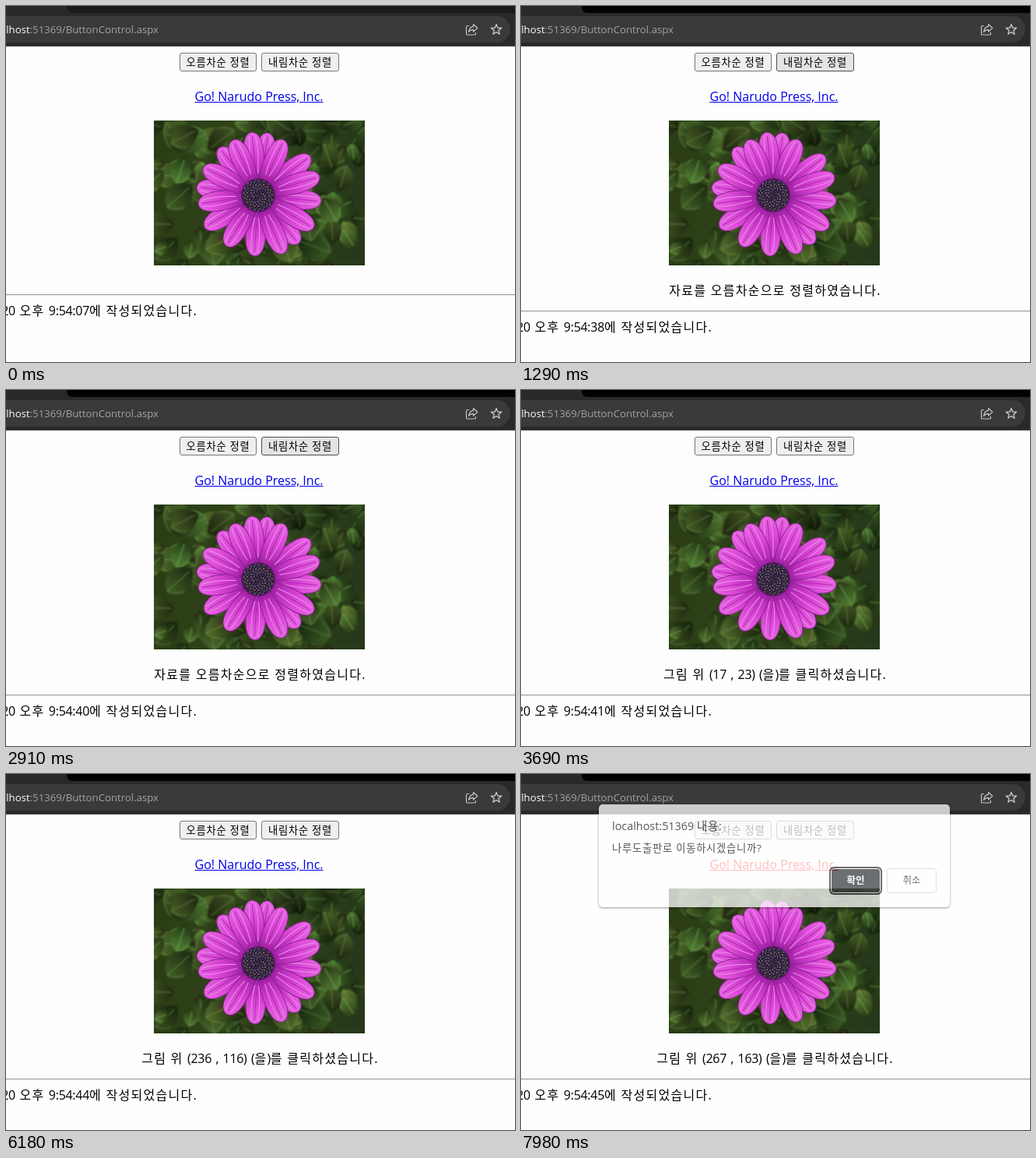
Recreate the animation shown at these times as an HTML page with a canvas. Size 654 by 457 pixels, loop 8000 ms.

```html
<!DOCTYPE html>
<html lang="ko">
<head>
<meta charset="utf-8">
<title>ButtonControl</title>
<style>
html, body { margin: 0; width: 100%; height: 100%; overflow: hidden; background: #fff; }
body { font: 16px/24px "Open Sans", "Noto Sans CJK KR", "Noto Sans CJK JP", "Noto Sans", sans-serif; color: #000; }
#stage { position: relative; width: 654px; height: 457px; overflow: hidden; background: #fefefe; }
#stage * { position: absolute; box-sizing: border-box; white-space: pre; }
#stage i, #stage b { position: static; font-style: normal; font-weight: 400; }
#bar { left: 0; top: 0; }
#url { left: -31px; width: 227px; top: 18px; text-align: right; font-size: 13.2px; color: #a3a3a3; }
#url b { color: #fff; }
.btn { top: 60px; height: 24px; line-height: 22px; font-size: 13.33px; letter-spacing: .73px; text-align: center;
  border: 1px solid #767676; border-radius: 3px; background: #efefef; }
.btn.hover { background: #e4e4e4; border-color: #4f4f4f; }
.btn.press { background: #f5f5f5; border-color: #8d8d8d; }
#link { top: 104px; left: 0; width: 650px; text-align: center; color: #00e; text-decoration: underline; text-underline-offset: 1px; }
#link.active { color: #f00; }
#photo { left: 190px; top: 147px; }
.page { letter-spacing: 1.28px; }
.page i { letter-spacing: -.3px; }
#msg { left: 0; width: 653px; top: 353px; text-align: center; }
#rule { left: 0; width: 654px; height: 2px; border-top: 1px solid #9a9a9a; border-bottom: 1px solid #eee; }
#date { right: 408px; }
#dialog { left: 100px; top: 39px; width: 451px; height: 132px; background: #fff; border-radius: 5px;
  box-shadow: 0 1px 3px rgba(0,0,0,.55); color: #202124; }
#dialog .title { left: 17px; top: 16px; font-size: 14.4px; }
#dialog .ask { left: 17px; top: 44px; font-size: 13.33px; letter-spacing: .73px; }
#dialog .act { top: 82px; width: 64px; height: 32px; line-height: 30px; font-size: 12.5px; text-align: center;
  border: 1px solid #d5d7da; border-radius: 4px; color: #3c4043; }
#dialog .ok { left: 298px; background: #3c4043; color: #fff; font-weight: 600; border-color: #fff;
  box-shadow: 0 0 0 2px #3c4043; }
#dialog .no { left: 370px; }
</style>
</head>
<body>
<div id="stage">
  <svg id="bar" width="654" height="52">
    <rect width="654" height="52" fill="#292929"/>
    <path id="strip" d="M78 0H654V9H86Q78 9 78 1Z"/>
    <rect x="-40" y="13" width="688" height="34" rx="17" fill="#3a3a3a"/>
    <path d="M0 51.5H654" stroke="#4a4a4a"/>
    <g fill="none" stroke="#c4c4c4" stroke-width="1.2" stroke-linejoin="round">
      <path d="M595 25.5H592.5Q591.5 25.5 591.5 26.5V36Q591.5 37 592.5 37H602.5Q603.5 37 603.5 36V34"/>
      <path d="M600.5 23.5L605.8 28.3L600.5 33V30.3Q596.5 30.3 594.5 33.5Q595 27 600.5 26.3Z"/>
      <path id="star" stroke-width="1.4"/>
    </g>
  </svg>
  <div id="url"><b>localhost</b>:51369/ButtonControl.aspx</div>
  <div class="btn" id="asc" style="left:223px;width:99px">오름차순 정렬</div>
  <div class="btn" id="desc" style="left:328px;width:100px">내림차순 정렬</div>
  <div id="link">Go! Narudo Press, Inc.</div>
  <canvas id="photo" width="271" height="186"></canvas>
  <div id="msg" class="page"></div>
  <div id="rule"></div>
  <div id="date" class="page"></div>
  <div id="dialog">
    <div class="title">localhost:51369 <b style="letter-spacing:.7px">내용:</b></div>
    <div class="ask">나루도출판로 이동하시겠습니까?</div>
    <div class="act ok">확인</div>
    <div class="act no">취소</div>
  </div>
</div>
<script>
const LOOP = 8000;
const $ = id => document.getElementById(id);

const sorted = way => `자료를 ${way}차순으로 정렬하였습니다.`;
const clicked = (x, y) => `그림 위 (${x} , ${y}) (을)를 클릭하셨습니다.`;

// time, message, seconds of the page stamp
const PAGES = [
  [0, '', '07'],
  [960, sorted('오름'), '38'],
  [2100, sorted('내림'), '39'],
  [2640, sorted('오름'), '40'],
  [3180, sorted('내림'), '40'],
  [3690, clicked(17, 23), '41'],
  [3990, clicked(24, 147), '41'],
  [4320, clicked(35, 162), '42'],
  [4620, clicked(246, 158), '42'],
  [4980, clicked(251, 28), '42'],
  [5400, clicked(42, 31), '43'],
  [5670, clicked(118, 143), '43'],
  [6180, clicked(236, 116), '44'],
  [6450, clicked(154, 102), '44'],
  [6750, clicked(228, 37), '44'],
  [7020, clicked(267, 163), '45']
];

// time, state of the left button, state of the right button
const BUTTONS = [
  [0, '', ''], [210, 'hover', ''], [900, 'press', ''], [1020, 'hover', ''],
  [1230, '', ''], [1290, '', 'hover'], [2010, '', 'press'], [2100, '', 'hover'],
  [2280, '', ''], [2340, 'hover', ''], [2550, 'press', ''], [2640, 'hover', ''],
  [2850, '', ''], [2910, '', 'hover'], [3120, '', 'press'], [3180, '', 'hover'],
  [3300, '', '']
];

// time, opacity, vertical offset
const DIALOG = [[0, 0, -5], [7920, .25, -5], [7950, .5, -2], [7980, .75, 0]];

const at = (table, t) => table.findLast(row => row[0] <= t);
const tighten = s => s.replace(/[\d:(),]+/g, '<i>$&</i>');

function setHtml(el, html) {
  if (el.dataset.html !== html) el.innerHTML = el.dataset.html = html;
}

function render(t) {
  const [, msg, sec] = at(PAGES, t);
  const [, left, right] = at(BUTTONS, t);
  const [, alpha, dy] = at(DIALOG, t);
  const shift = msg ? 21 : 0;
  setHtml($('msg'), tighten(msg));
  setHtml($('date'), tighten(`2023-08-20 오후 9:54:${sec}에 작성되었습니다.`));
  $('rule').style.top = 370 + shift + 'px';
  $('date').style.top = 379 + shift + 'px';
  $('strip').style.fill = t < 900 ? '#1a1a1a' : '#020202';
  $('asc').className = 'btn ' + left;
  $('desc').className = 'btn ' + right;
  $('link').className = t >= 7830 ? 'active' : '';
  $('dialog').style.opacity = alpha;
  $('dialog').style.transform = `translateY(${dy}px)`;
}

function drawStar() {
  const points = Array.from({ length: 10 }, (_, i) => {
    const a = i * Math.PI / 5 - Math.PI / 2, r = i % 2 ? 3 : 7;
    return [630 + r * Math.cos(a), 30.5 + r * Math.sin(a)].map(v => v.toFixed(1)).join(' ');
  });
  $('star').setAttribute('d', 'M' + points.join('L') + 'Z');
}

function drawPhoto() {
  const c = $('photo').getContext('2d');
  let seed = 11;
  const rnd = () => (seed = seed * 16807 % 2147483647) / 2147483647;
  const shade = (x0, x1, ...colors) => {
    const g = c.createLinearGradient(x0, 0, x1, 0);
    colors.forEach((col, i) => g.addColorStop(i / (colors.length - 1), col));
    return g;
  };
  const disc = (x, y, r, fill) => {
    c.fillStyle = fill;
    c.beginPath();
    c.arc(x, y, r, 0, 7);
    c.fill();
  };

  // soft foliage
  c.fillStyle = shade(0, 271, '#2c3d16', '#2f4519', '#26381a');
  c.fillRect(0, 0, 271, 186);
  c.filter = 'blur(1px)';
  for (let i = 0; i < 130; i++) {
    const x = rnd() * 271, y = rnd() * 186, len = 18 + rnd() * 30, w = len * .5;
    const dark = x > 150 && y < 50 ? 9 : 0;
    const light = 22 + rnd() * 15 - dark;
    const hue = 82 + rnd() * 16;
    c.save();
    c.translate(x, y);
    c.rotate(rnd() * 6.28);
    c.fillStyle = shade(0, len, `hsl(${hue} 45% ${light * .4}%)`, `hsl(${hue} 42% ${light}%)`);
    c.beginPath();
    c.moveTo(0, 0);
    c.bezierCurveTo(len * .3, -w, len * .8, -w, len, 0);
    c.bezierCurveTo(len * .8, w, len * .3, w, 0, 0);
    c.fill();
    c.strokeStyle = `hsl(${hue} 36% ${light + 9}%)`;
    c.lineWidth = 1.2;
    c.beginPath();
    c.moveTo(len * .6, -w * .7);
    c.quadraticCurveTo(len * .9, -w * .5, len, 0);
    c.moveTo(4, 0);
    c.lineTo(len, 0);
    c.stroke();
    c.restore();
  }
  c.filter = 'none';

  // petals, by tip position; every other one lies behind
  const cx = 134, cy = 96;
  const tips = [
    [126, 15], [147, 16], [167, 25], [201, 46], [213, 72], [215, 104], [205, 138], [186, 158],
    [166, 171], [129, 174], [93, 161], [65, 137], [57, 107], [55, 85], [64, 60], [84, 35], [102, 25]
  ];
  const petal = ([tx, ty]) => {
    const len = Math.hypot(tx - cx, ty - cy), w = 15;
    c.save();
    c.translate(cx, cy);
    c.rotate(Math.atan2(ty - cy, tx - cx));
    c.fillStyle = shade(10, len, '#7d1484', '#bd2fbd', '#dc4bd8', '#e465e0');
    c.beginPath();
    c.moveTo(8, -5);
    c.bezierCurveTo(len * .5, -w, len * .97, -w - 2, len, -1);
    c.bezierCurveTo(len * .99, w + 2, len * .5, w, 8, 5);
    c.fill();
    c.strokeStyle = '#85208a';
    c.lineWidth = .9;
    c.stroke();
    for (const k of [-5, 0, 5]) {
      c.strokeStyle = k ? '#ee88ea' : '#b52ab5';
      c.lineWidth = 1.1;
      c.beginPath();
      c.moveTo(28, k * .5);
      c.quadraticCurveTo(len * .7, k * 1.4, len * .94, k * .8);
      c.stroke();
    }
    c.restore();
  };
  tips.filter((_, i) => i % 2).forEach(petal);
  tips.filter((_, i) => i % 2 === 0).forEach(petal);

  // flower head
  disc(cx, cy, 22, '#5b1968');
  disc(cx, cy, 20, '#2d2238');
  const dots = ['#74628a', '#a18a74', '#4b3a60', '#8c7098'];
  for (let i = 0; i < 110; i++) {
    const r = 1.9 * Math.sqrt(i), a = i * 2.39996;
    disc(cx + r * Math.cos(a), cy + r * Math.sin(a), .9, dots[i % 4]);
  }
  disc(cx, cy, 5, 'rgba(35,28,62,.5)');
}

drawStar();
drawPhoto();
const start = performance.now();
(function tick() {
  render((performance.now() - start) % LOOP);
  requestAnimationFrame(tick);
})();
</script>
</body>
</html>
```
